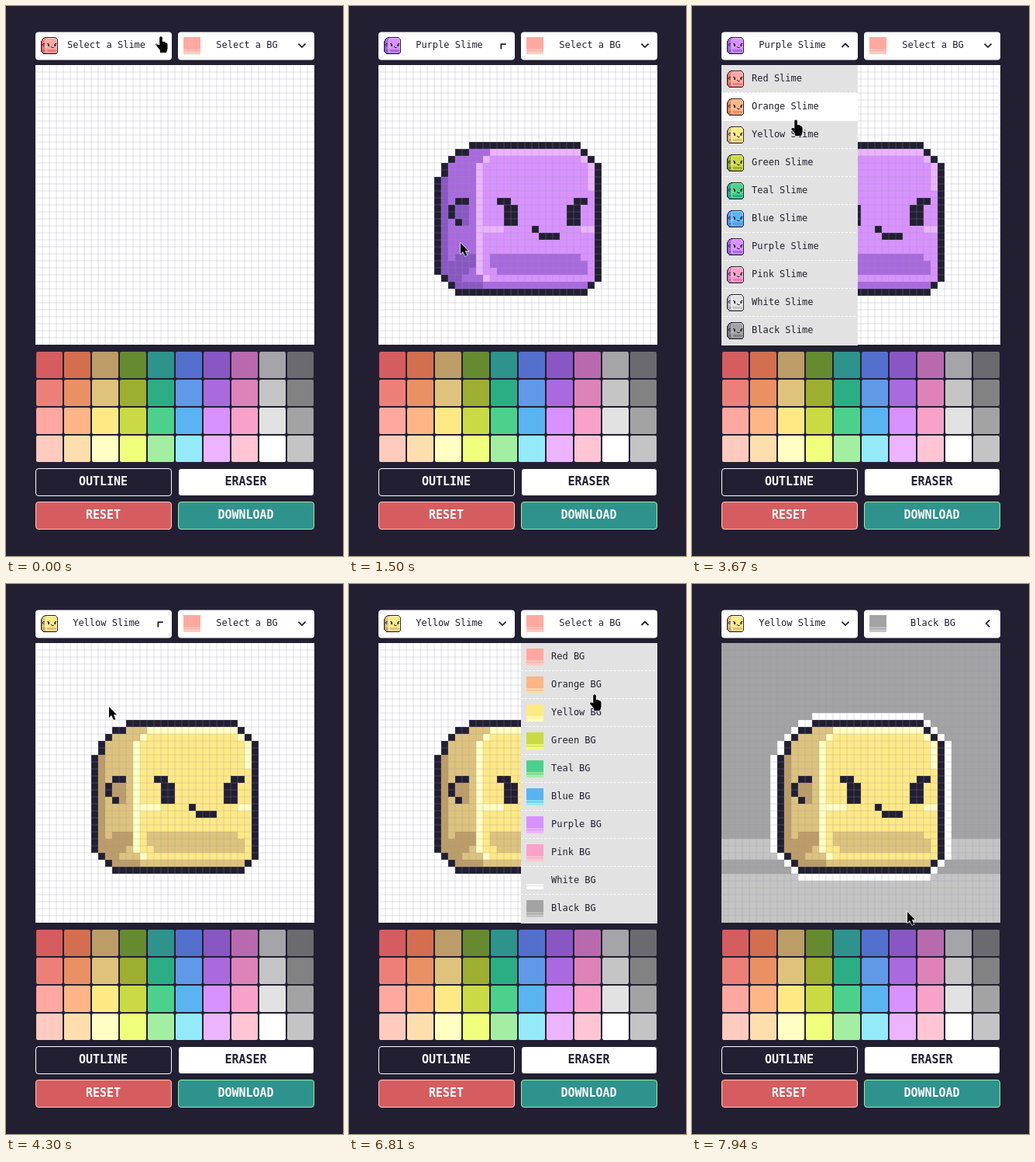
Write an HTML page with a canvas that moves like this. It is 435 px wide and 708 px high and loops after 8000 ms.

```html
<!DOCTYPE html>
<html lang="en">
<head>
<meta charset="utf-8">
<title>Slime maker</title>
<style>
  html, body { margin: 0; height: 100%; overflow: hidden; background: #221f33; }
  canvas { display: block; }
</style>
</head>
<body>
<canvas id="stage" width="435" height="708"></canvas>
<script>
const ctx = document.getElementById('stage').getContext('2d');
const NAVY = '#221f33', MONO = '"DejaVu Sans Mono", monospace';
const LOOP = 8000, STEP = 126;
const COLUMN = { Slime: 38, BG: 222 }, LEFT = 38, TOP = 76, CELL = 9, ROW = 36;

// Each colour: dark, mid, base, light
const COLORS = Object.entries({
  Red: '#d55d5f #ec8078 #ffa8a0 #ffcbbe',
  Orange: '#d36f4f #ea9065 #ffb585 #ffdeae',
  Yellow: '#bc9d67 #dec37d #ffe985 #ffffc3',
  Green: '#668a30 #9eae30 #cada45 #f0ff7b',
  Teal: '#2e938c #2bae83 #4bd18b #a4eea2',
  Blue: '#5370ce #6099e8 #59b4f1 #94eaf9',
  Purple: '#8857c3 #a96adf #d892ff #ecb4ff',
  Pink: '#b96aae #de83ba #f9a2c9 #ffc5d2',
  White: '#a4a4a9 #c5c5c5 #e2e2e2 #ffffff',
  Black: '#6b6a6f #828282 #a3a3a4 #c4c4c4'
}).map(([name, shades]) => ({ name, shades: shades.split(' ') }));
const [RED, YELLOW, PURPLE, BLACK] = [0, 2, 6, 9];

const between = (v, low, high) => v >= low && v <= high;
const clamp = v => Math.min(1, Math.max(0, v));

// Rounded block on the 40 x 40 board
function inside(col, row) {
  const fromTop = row - 11, fromBottom = 32 - row;
  if (fromTop < 0 || fromBottom < 0) return false;
  const left = [13, 11, 10, 9, 9][fromTop] ?? Math.max(8, 11 - fromBottom);
  const right = 31 - Math.max(0, 3 - fromTop, 2 - fromBottom);
  return between(col, left, right);
}

const neighbours = (col, row) =>
  [inside(col - 1, row), inside(col + 1, row), inside(col, row - 1), inside(col, row + 1)];

function isFace(col, row) {
  const aside = Math.abs(col - 23);
  const brow = row === 19 && between(aside, 5, 6);
  const eye = between(row, 20, 22) && between(aside, 4, 5);
  const mouth = row === 23 ? col === 22 : row === 24 && between(col, 23, 25);
  const ear = between(row, 19, 22) && (row === 19 ? between(col, 11, 12) : col === (row === 22 ? 11 : 10));
  return brow || eye || mouth || ear;
}

function shadeAt(col, row, [dark, mid, base, light]) {
  const seam = 14 + Math.max(0, 14 - row, row - 29);
  if (!neighbours(col, row).every(Boolean) || isFace(col, row)) return NAVY;
  if (row === 31) return col < 15 ? dark : mid;
  if (col < seam) {
    const inEar = between(row, 20, 22) && between(col, 11, 12);
    const shadow = row > 26 && between(col + row, 38, 41);
    return col === 9 || inEar || shadow ? dark : mid;
  }
  const rim = row === 12 || row < 18 && !inside(col + 2, row);
  const cheek = row === 23 && (col < 18 || col > 28);
  if (col === seam || rim || cheek) return light;
  const band = between(row, 27, 29) && between(col, row > 28 ? 17 : 16, row > 27 ? 29 : 28);
  return band ? mid : base;
}

function eachCell(paint) {
  for (let row = 0; row < 40; row++) for (let col = 0; col < 40; col++) paint(col, row);
}

const slimes = COLORS.map(({ shades }) => {
  const board = document.createElement('canvas');
  board.width = board.height = 40;
  const g = board.getContext('2d');
  eachCell((col, row) => {
    if (!inside(col, row)) return;
    g.fillStyle = shadeAt(col, row, shades);
    g.fillRect(col, row, 1, 1);
  });
  return board;
});

function rect(color, x, y, w, h) {
  ctx.fillStyle = color;
  ctx.fillRect(x, y, w, h);
}

function box(x, y, w, h, radius, fill, border) {
  ctx.beginPath();
  ctx.roundRect(x, y, w, h, radius);
  ctx.fillStyle = fill;
  ctx.fill();
  if (!border) return;
  ctx.strokeStyle = border;
  ctx.lineWidth = 1;
  ctx.stroke();
}

function text(string, x, y, align = 'left', font = '12px', color = NAVY) {
  ctx.font = `${font} ${MONO}`;
  ctx.textAlign = align;
  ctx.fillStyle = color;
  ctx.fillText(string, x, y);
}

function backdrop(color, x, y, size) {
  const [, , base, light] = COLORS[color].shades;
  rect(base, x, y, size, size);
  rect(light, x, y + size * .7, size, size * .075);
  rect(light, x, y + size * .825, size, size * .175);
}

function icon(kind, color, x, y) {
  if (kind === 'BG') return backdrop(color, x + 7, y - 11, 22);
  ctx.imageSmoothingEnabled = true;
  ctx.drawImage(slimes[color], 8, 11, 24, 22, x + 7, y - 11, 22, 22);
}

function drawBoard(slime, bg) {
  rect('#fff', LEFT, TOP, 360, 360);
  if (bg !== null) {
    backdrop(bg, LEFT, TOP, 360);
    eachCell((col, row) => {
      if (!inside(col, row) && neighbours(col, row).some(Boolean))
        rect('#fff', LEFT + col * CELL, TOP + row * CELL, CELL, CELL);
    });
  }
  if (slime !== null) {
    ctx.imageSmoothingEnabled = false;
    ctx.drawImage(slimes[slime], LEFT, TOP, 360, 360);
  }
  for (let i = CELL; i < 360; i += CELL) {
    rect('rgba(150,150,160,.15)', LEFT + i - 1, TOP, 2, 360);
    rect('rgba(150,150,160,.15)', LEFT, TOP + i - 1, 360, 2);
  }
}

function drawHeader(kind, color, turn) {
  const x = COLUMN[kind];
  box(x, 33.5, 176, 36, 4, '#fff');
  icon(kind, color ?? RED, x, 51);
  text(color === null ? `Select a ${kind}` : `${COLORS[color].name} ${kind}`, x + (kind === 'BG' ? 89 : 91.5), 54, 'center');
  ctx.save();
  ctx.translate(x + 160, 50.8);
  ctx.rotate(turn * Math.PI);
  ctx.beginPath();
  ctx.moveTo(-4.5, -2.2);
  ctx.lineTo(0, 2.3);
  ctx.lineTo(4.5, -2.2);
  ctx.strokeStyle = NAVY;
  ctx.lineWidth = 1.8;
  ctx.stroke();
  ctx.restore();
}

function drawMenu(kind, hover) {
  const x = COLUMN[kind];
  rect('#e2e2e2', x, TOP, 176, ROW * 10 + 1);
  COLORS.forEach(({ name }, i) => {
    const y = TOP + i * ROW;
    if (i === hover) rect('#fff', x, y, 176, ROW);
    if (i < 9) for (let dash = 0; dash < 174; dash += 5) rect('#fff', x + dash, y + ROW - 1, 3, 1);
    icon(kind, i, x, y + 18);
    text(`${name} ${kind}`, x + 39, y + 21);
  });
}

function drawButton(label, x, y, fill, border, ink) {
  box(x + .5, y + .5, 175, 35, 3.5, fill, border);
  text(label, x + 87.5, y + 22, 'center', 'bold 15px', ink);
}

function drawControls() {
  COLORS.forEach(({ shades }, col) => shades.forEach((color, row) =>
    box(LEFT + 1 + col * ROW, 445 + row * ROW, 34, 34, 2, color)));
  drawButton('OUTLINE', COLUMN.Slime, 595, NAVY, '#fff', '#fff');
  drawButton('ERASER', COLUMN.BG, 595, '#fff', NAVY, NAVY);
  drawButton('RESET', COLUMN.Slime, 638, '#d55d5f', '#ffcbbe', '#fff');
  drawButton('DOWNLOAD', COLUMN.BG, 638, '#2e938c', '#a4eea2', '#fff');
}

// Times in steps: the header is pressed, its menu opens, then closes on the picked colour
const MENUS = [
  { kind: 'Slime', press: 1, open: 2, close: 11, pick: PURPLE },
  { kind: 'Slime', press: 22, open: 24, close: 34, pick: YELLOW },
  { kind: 'BG', press: 49, open: 50, close: 62, pick: BLACK }
];
const START = { x: 199, y: 39 };
const GLIDES = [
  { from: 2, to: 6, x: 144, y: 305 },
  { from: 15, to: 19, x: 134, y: 46 },
  { from: 25, to: 30, x: 133, y: 158 },
  { from: 42, to: 46, x: 293, y: 44 },
  { from: 52, to: 58, x: 278, y: 422, bow: 37 }
];
const HAND = new Path2D('M-.8 1.5Q1 -1 2.8 1.5V7Q6 6 6.5 8Q9.5 8 9.5 11V16L8 21H0V18L-5 12Q-4 9.5 -.8 11.5Z');
const ARROW = new Path2D('M0 0V14L3 11L6 17L8.5 16L5.8 10.3H10Z');

function pointerAt(step) {
  let { x, y } = START;
  for (const glide of GLIDES) {
    const t = clamp((step - glide.from) / (glide.to - glide.from));
    const k = t * t * (3 - 2 * t);
    x += (glide.x - x) * k + (glide.bow ?? 0) * Math.sin(Math.PI * k);
    y += (glide.y - y) * k;
  }
  return { x, y };
}

function chevronTurn(kind, step) {
  const progress = from => clamp((step - from + 1) / 4);
  return MENUS.filter(m => m.kind === kind)
    .reduce((turn, { open, close }) => turn + progress(open) - progress(close), 0);
}

const picked = (kind, step) => MENUS.findLast(m => m.kind === kind && step >= m.close)?.pick ?? null;

function drawPointer(step, menu) {
  const { x, y } = pointerAt(step);
  const clicking = MENUS.some(m => between(step, m.press, m.open - 1) || between(step, m.close - 2, m.close - 1));
  if (clicking) {
    ctx.beginPath();
    ctx.arc(x, y, 12, 0, 7);
    ctx.fillStyle = 'rgba(255,238,60,.75)';
    ctx.fill();
  }
  const overMenu = menu && between(x - COLUMN[menu.kind], 0, 176);
  const shape = y > TOP && !overMenu ? ARROW : HAND;
  ctx.save();
  ctx.translate(x, y);
  ctx.strokeStyle = '#fff';
  ctx.lineWidth = 1.2;
  ctx.stroke(shape);
  ctx.fillStyle = '#000';
  ctx.fill(shape);
  ctx.restore();
}

function draw(time) {
  const step = Math.floor((time % LOOP + 10) / STEP);
  const slime = picked('Slime', step), bg = picked('BG', step);
  const menu = MENUS.find(m => between(step, m.open, m.close - 1));

  rect(NAVY, 0, 0, 435, 708);
  drawHeader('Slime', slime, chevronTurn('Slime', step));
  drawHeader('BG', bg, chevronTurn('BG', step));
  drawBoard(slime, bg);
  // Row highlight trails the pointer by one step
  if (menu) drawMenu(menu.kind, Math.floor((pointerAt(step - 1).y - TOP) / ROW));
  drawControls();
  drawPointer(step, menu);
}

const start = performance.now();
function tick() {
  draw(performance.now() - start);
  requestAnimationFrame(tick);
}
tick();
</script>
</body>
</html>
```
